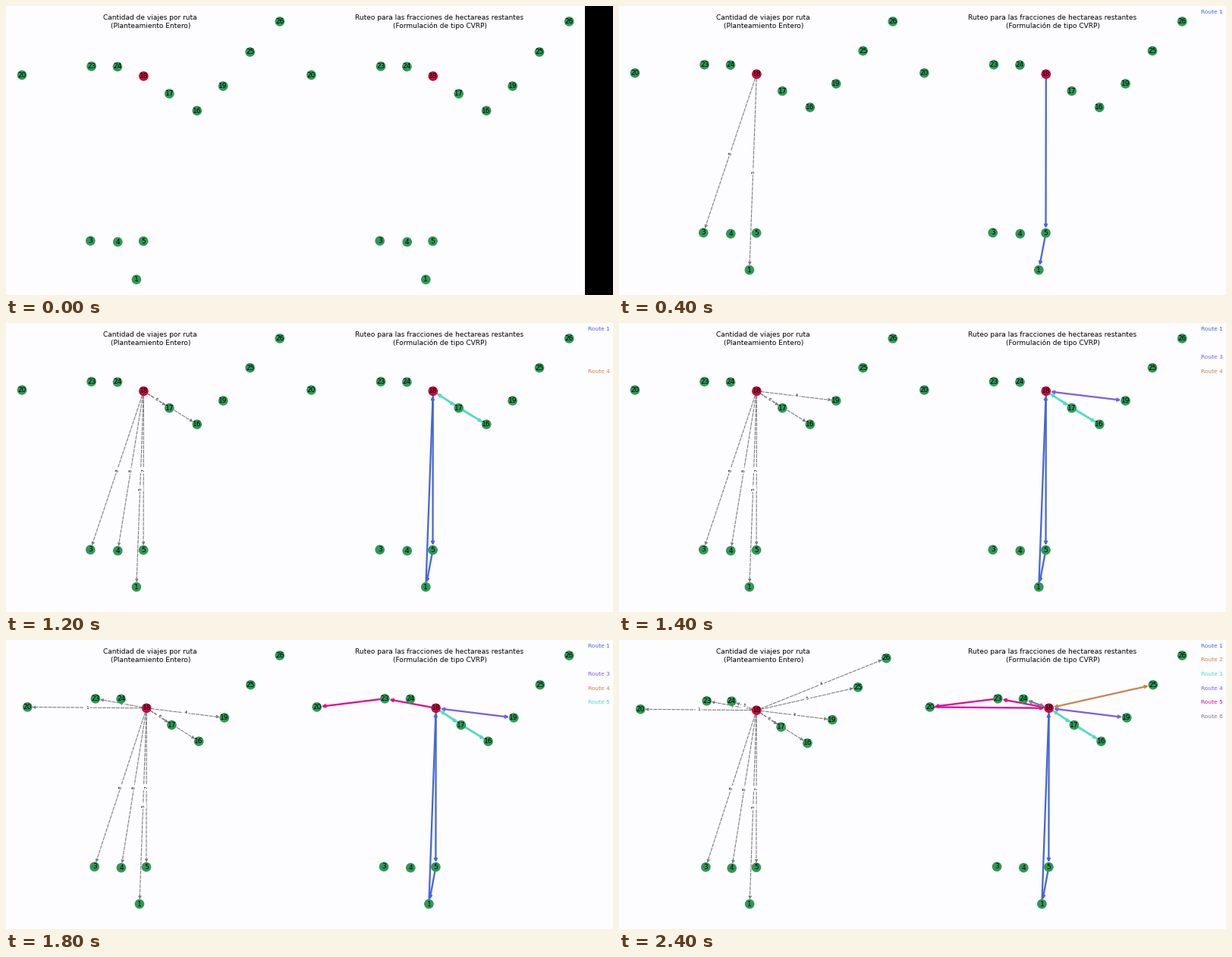
Animation, 800 px wide and 381 px high, one loop 2.6 s. Source, as a matplotlib script:

```python
import math

import matplotlib.pyplot as plt
from matplotlib.animation import FuncAnimation
from matplotlib.patches import Circle, FancyArrowPatch, Rectangle

W, H = 800, 381
FRAMES, INTERVAL = 13, 200
PT = 0.54  # drawing points to figure points

BG, GREEN, RED = "#fdfcfe", "#2e9956", "#c8083f"
GREY_DASH = "#7f7f7f"
BLUE, BROWN, TEAL = "#4466dc", "#c8864a", "#50dcc2"
PURPLE, MAGENTA, GREY = "#7a5ee2", "#e4058f", "#76808a"

DEPOT = 18
NODES = {
    20: (21, 91), 23: (112.6, 79.5), 24: (147, 80), 18: (181.4, 92.5),
    17: (215.3, 115.6), 16: (251.8, 138), 19: (286.2, 105.6),
    25: (321.6, 60.6), 26: (360.8, 20.4), 3: (111.3, 309.6),
    4: (147.3, 311), 5: (181.1, 310), 1: (171.9, 360.6),
}
RIGHT_PANEL = 381.4

# Trips from the depot, one added per step
TRIPS = [(1, 5), (3, 8), (4, 8), (5, 7), (16, 6), (17, 6),
         (19, 4), (20, 1), (23, 3), (24, 5), (25, 5), (26, 4)]

# Route legs, one added per step; single-stop routes run both ways
LEGS = [
    (18, 5, BLUE), (5, 1, BLUE), (1, 18, BLUE),
    (18, 17, TEAL), (17, 16, TEAL), (16, 18, TEAL),
    (18, 19, PURPLE),
    (18, 23, MAGENTA), (23, 20, MAGENTA), (20, 18, MAGENTA),
    (18, 24, GREY), (18, 25, BROWN),
]
ROUND_TRIPS = {19, 24, 25}

# (first step, route number, colour)
LEGEND = [(1, 1, BLUE), (4, 4, BROWN), (7, 3, PURPLE), (8, 5, TEAL), (11, 6, MAGENTA)]
FINAL_LEGEND = [BLUE, BROWN, TEAL, PURPLE, MAGENTA, GREY]

TITLES = [
    (189.7, "Cantidad de viajes por ruta", "(Planteamiento Entero)"),
    (571, "Ruteo para las fracciones de hectareas restantes",
     "(Formulación de tipo CVRP)"),
]

fig = plt.figure(figsize=(W / 100, H / 100), dpi=100, facecolor=BG)
ax = fig.add_axes([0, 0, 1, 1])
plt.rcParams["font.family"] = "DejaVu Sans"


def layout(offset, visited):
    """Node positions; the view widens once an edge reaches an outer node."""
    left = 28.3 if 20 in visited else 21
    right = 352.3 if 26 in visited else 360.8
    top = 24 if 26 in visited else 20.4
    bottom = 348 if 1 in visited else 360.6
    sx, sy = (right - left) / 339.8, (bottom - top) / 340.2
    return {n: (offset + left + (x - 21) * sx, top + (y - 20.4) * sy)
            for n, (x, y) in NODES.items()}


def text(x, y, s, size, **kw):
    ax.text(x, y, s, fontsize=size * PT, **kw)


def arrow(a, b, color, width, style="-|>", dash="-"):
    ax.add_patch(FancyArrowPatch(
        a, b, arrowstyle=style, mutation_scale=10 * PT, color=color,
        linewidth=width * PT, linestyle=dash,
        shrinkA=8 * PT, shrinkB=8 * PT, zorder=1))


def edge_label(a, b, s):
    angle = math.degrees(math.atan2(a[1] - b[1], b[0] - a[0]))
    if angle > 90:
        angle -= 180
    elif angle < -90:
        angle += 180
    text((a[0] + b[0]) / 2, (a[1] + b[1]) / 2, s, 8, rotation=angle,
         ha="center", va="center", zorder=1,
         bbox=dict(boxstyle="round", fc="white", ec="white", lw=PT))


def draw_nodes(pos):
    for n, (x, y) in pos.items():
        ax.add_patch(Circle((x, y), 6.3, fc=RED if n == DEPOT else GREEN,
                            lw=0, zorder=2))
        text(x, y, str(n), 12, ha="center", va="center", zorder=3)


def draw_legend(step):
    if step == FRAMES - 1:
        rows = enumerate(FINAL_LEGEND, 1)
    else:
        rows = [(n, c) for start, n, c in LEGEND if step >= start]
    for n, color in rows:
        text(766.8, 9.8 + 18.65 * (n - 1), f"Route {n}", 10, color=color)


def update(step):
    ax.cla()
    ax.set(xlim=(0, W), ylim=(H, 0))
    ax.axis("off")

    trips, legs = TRIPS[:step], LEGS[:step]
    pos = layout(0, {n for n, _ in trips})
    for n, _ in trips:
        arrow(pos[DEPOT], pos[n], GREY_DASH, 1.5, dash="--")
    for n, count in trips:
        edge_label(pos[DEPOT], pos[n], str(count))
    draw_nodes(pos)

    pos = layout(RIGHT_PANEL, {n for leg in legs for n in leg[:2]})
    for a, b, color in legs:
        style = "<|-|>" if b in ROUND_TRIPS else "-|>"
        arrow(pos[a], pos[b], color, 3, style)
    draw_nodes(pos)

    for x, first, second in TITLES:
        text(x, 18.4, first, 12, ha="center")
        text(x + 1, 29.2, second, 12, ha="center")
    if step == 0:
        ax.add_patch(Rectangle((762.6, 0), W, H, fc="black", lw=0))
    draw_legend(step)
    return []


anim = FuncAnimation(fig, update, frames=FRAMES, interval=INTERVAL,
                     init_func=lambda: [], repeat=True, repeat_delay=0)
plt.show()
```
